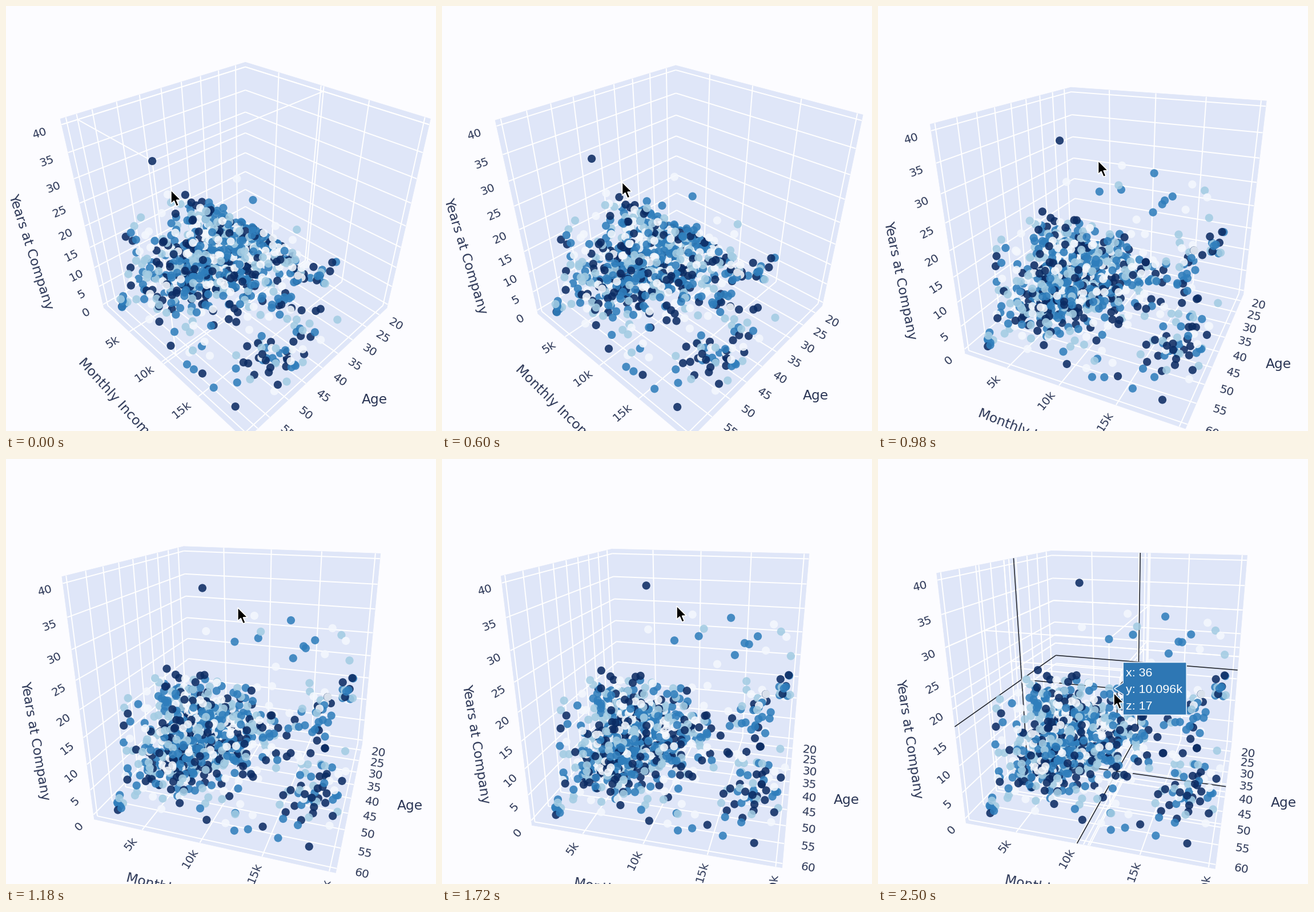
A matplotlib script for the animation above (2520 ms loop, 753 px wide and 743 px high).

```python
import numpy as np
import matplotlib.pyplot as plt
from matplotlib.animation import FuncAnimation
from matplotlib.collections import LineCollection
from matplotlib.patches import Polygon

W, H, DPI = 753, 743, 100
FRAMES, STEP = 126, 20
PX = 72 / DPI

BACK, WALL, INK = "#fcfcff", "#dfe6f8", "#2a3555"
BLUES = np.array(["#f4f8fe", "#a3cce3", "#2f7ebc", "#0b2b63"])
HOVER = "#2e77b4"

# Axis bounds: age, income, years
LOW = np.array([17, 551, -0.97])
SPAN = np.array([44, 19905, 41.94])
TICKS = range(20, 61, 5), range(5000, 20001, 5000), range(0, 41, 5)
HALF = 0.5

# Perspective camera
FOCAL, DIST, CX, CY = 860, 2.165, 419.2, 384.5

# Drag key points: time, turn from the diagonal, elevation
POSE = np.array([(550, 0, 35.26), (800, 11.5, 27.4), (980, 20.15, 23.7),
                 (1180, 27.2, 21.1), (1400, 30.8, 20), (1740, 30.8, 20),
                 (2040, 29.4, 19)])

FIRST_HOVER, DRAG_START = (58, 10312, 40), 550
HOVERS = [(49, 11103, 30), (40, 10965, 22), (38, 10609, 20), (36, 10096, 17)]
HOVER_START, HOVER_GAP = 2180, 75


def unit(p):
    return (np.asarray(p, float) - LOW) / SPAN - 0.5


def make_points():
    rng = np.random.default_rng(11)

    def people(age, pay, years):
        cap = np.minimum(age - 18, 22) * rng.uniform(0.75, 1, len(age))
        return np.column_stack([np.round(age), pay, np.round(np.minimum(years, cap))])

    def cluster(n, mid, spread):
        return rng.normal(mid, spread, (n, 3))

    n = 900
    pay = 1100 + rng.gamma(2.4, 2000, n)
    staff = people(rng.triangular(18, 37, 60, n), np.where(pay > 14000, pay / 2, pay),
                   rng.gamma(1.35, 5.4, n))
    n = 80
    senior = people(rng.triangular(32, 45, 58, n), rng.triangular(14500, 17500, 20000, n),
                    np.where(rng.random(n) < 0.5, rng.gamma(1.5, 2.2, n),
                             rng.normal(18, 4, n)))

    # Long-serving few, with incomes crowding towards the top
    veterans = cluster(15, (51, 0, 32.2), (2.5, 0, 1.7))
    veterans[:, 1] = 10000 + 9800 * np.linspace(0, 1, 15) ** 0.6
    # Near retirement but new to the company
    late = cluster(8, (57, 0, 1.5), (1.7, 0, 1))
    late[:, 1] = np.linspace(10200, 18300, 8)

    rows = np.vstack([staff, senior, veterans, late,
                      cluster(14, (40, 19300, 20.5), (1.5, 350, 1.3)),
                      cluster(22, (47, 18200, 3), (3, 1100, 2)),
                      cluster(7, (58, 2200, 1.5), (0.5, 150, 0.9)),
                      [HOVERS[0], HOVERS[-1], FIRST_HOVER]])
    rows = np.abs(np.minimum(rows, (60, 19999, 40)))
    shades = rng.choice(4, len(rows), p=[0.2, 0.22, 0.33, 0.25])
    shades[-3:] = 2, 2, 3
    return unit(rows), BLUES[shades]


def ease_out(t, start, length):
    return np.sin(np.pi / 2 * np.clip((t - start) / length, 0, 1))


def pose(t):
    return [np.interp(t, POSE[:, 0], col) for col in POSE.T[1:]]


def pointer(t):
    drag, drop = ease_out(t, 480, 860), ease_out(t, 2050, 370)
    return np.array([289, 322]) + drag * np.array([122, -65]) + drop * np.array([2, 152])


class Camera:
    def __init__(self, turn, tilt):
        a, e = np.radians(45 - turn), np.radians(tilt)
        self.right = np.array([-np.sin(a), np.cos(a), 0])
        self.up = np.array([-np.sin(e) * np.cos(a), -np.sin(e) * np.sin(a), np.cos(e)])
        self.eye = np.array([np.cos(e) * np.cos(a), np.cos(e) * np.sin(a), np.sin(e)])

    def depth(self, p):
        return DIST - np.asarray(p) @ self.eye

    def __call__(self, p):
        p, d = np.asarray(p, float), self.depth(p)
        return np.stack([CX + FOCAL * (p @ self.right) / d,
                         CY - FOCAL * (p @ self.up) / d], axis=-1)

    def slope(self, p, axis):
        step = np.eye(3)[axis] * 0.01
        dx, dy = self(p + step) - self(p - step)
        if dx < 0:
            dx, dy = -dx, -dy
        return -np.degrees(np.arctan2(dy, dx))


def tick(axis, value):
    return (value - LOW[axis]) / SPAN[axis] - 0.5


def wall_lines(axis, value):
    """The two lines where a plane of constant value meets the walls."""
    lines = []
    for free in range(3):
        if free != axis:
            ends = np.full((2, 3), -HALF)
            ends[1, free] = HALF
            ends[:, axis] = value
            lines.append(ends)
    return lines


def spike_lines(point):
    p = unit(point)
    lines = []
    for axis in range(3):
        foot = p.copy()
        foot[axis] = -HALF
        lines += wall_lines(axis, p[axis]) + [np.array([p, foot])]
    return lines


def wall(axis):
    corners = np.full((4, 3), -HALF)
    a, b = [i for i in range(3) if i != axis]
    corners[1:3, a] = HALF
    corners[2:, b] = HALF
    return corners


fig = plt.figure(figsize=(W / DPI, H / DPI), dpi=DPI, facecolor=BACK)
ax = fig.add_axes([0, 0, 1, 1])
ax.set_xlim(0, W)
ax.set_ylim(H, 0)
ax.axis("off")

WALLS = [wall(axis) for axis in range(3)]
GRID = np.array([line for axis in range(3) for v in TICKS[axis]
                 for line in wall_lines(axis, tick(axis, v))])
points, colours = make_points()

faces = [ax.add_patch(Polygon(np.zeros((4, 2)), fc=WALL, ec=WALL, lw=0.5, zorder=1))
         for _ in WALLS]


def line_set(colour, width, zorder):
    return ax.add_collection(LineCollection([], colors=colour, linewidths=width * PX,
                                            zorder=zorder))


grid = line_set("white", 2, 2)
trail = line_set("white", 2, 3)
spikes = line_set("#22252b", 1.6, 4)
dots = ax.scatter(points[:, 0], points[:, 1], s=(14.2 * PX) ** 2, c=colours,
                  alpha=0.87, linewidths=0, zorder=5)

labels = []


def add_label(text, size, place, along):
    """Place is in cube units; along is the axis the text follows, None for level."""
    art = ax.text(0, 0, text, size=size * PX, color=INK, family="DejaVu Sans",
                  ha="center", va="center", zorder=6)
    labels.append((art, np.array(place), along))


for v in TICKS[0]:
    add_label(str(v), 20, (tick(0, v), 0.59, -HALF), 1)
for v in TICKS[1]:
    add_label(f"{v // 1000}k", 20, (0.59, tick(1, v), -HALF), 0)
for v in TICKS[2]:
    add_label(str(v), 20, (0.59, -0.505, 0.985 * tick(2, v) - 0.002), 0)
add_label("Age", 23.4, (0, 0.75, -HALF), None)
add_label("Monthly Income", 23.4, (0.75, 0, -HALF), 1)
add_label("Years at Company", 23.4, (0.75, -HALF, -0.005), 2)

TIP = np.array([(-5, 0), (10.5, -10), (10.5, -46), (121.5, -46),
                (121.5, 46), (10.5, 46), (10.5, 10)])
tip = ax.add_patch(Polygon(TIP, fc=HOVER, ec="#e8f0fa", lw=1.6 * PX, zorder=8))
tip_rows = [ax.text(0, 0, "", size=21.4 * PX, color="white", family="Liberation Sans",
                    va="center_baseline", zorder=9) for _ in range(3)]

ARROW = np.array([(0, 0), (0, 23.5), (5.3, 18.6), (9.3, 28), (13.4, 26.3),
                  (9.5, 17.2), (17, 17)])
arrow = ax.add_patch(Polygon(ARROW, fc="black", ec="white", lw=1.6 * PX, zorder=10))


def show_tip(cam, point):
    for art in (tip, *tip_rows):
        art.set_visible(point is not None)
    if point is None:
        return
    at = cam(unit(point))
    tip.set_xy(at + TIP)
    age, pay, years = point
    texts = f"x: {age}", f"y: {pay / 1000:.3f}k", f"z: {years}"
    for i, (row, text) in enumerate(zip(tip_rows, texts)):
        row.set_text(text)
        row.set_position((at[0] + 15.5, at[1] + 29 * (i - 1)))


def update(i):
    t = i * STEP
    cam = Camera(*pose(t))
    for patch, face in zip(faces, WALLS):
        patch.set_xy(cam(face))
    grid.set_segments(cam(GRID))

    order = np.argsort(-cam.depth(points))
    dots.set_offsets(cam(points[order]))
    dots.set_facecolor(colours[order])

    for art, place, along in labels:
        art.set_position(cam(place))
        art.set_rotation(0 if along is None else cam.slope(place, along))

    # Earlier hovers leave white lines until the view turns again
    seen = HOVERS[:max(0, (t - HOVER_START) // HOVER_GAP + 1)]
    old = [FIRST_HOVER] if t < DRAG_START else seen[:-1]
    now = seen[-1] if seen else None
    trail.set_segments([cam(line) for p in old for line in spike_lines(p)])
    spikes.set_segments([cam(line) for line in spike_lines(now)] if now else [])
    show_tip(cam, now)

    arrow.set_xy(ARROW + pointer(t))
    return []


anim = FuncAnimation(fig, update, frames=FRAMES, interval=STEP, repeat=True,
                     repeat_delay=0, blit=False, init_func=lambda: update(0))
plt.show()
```
